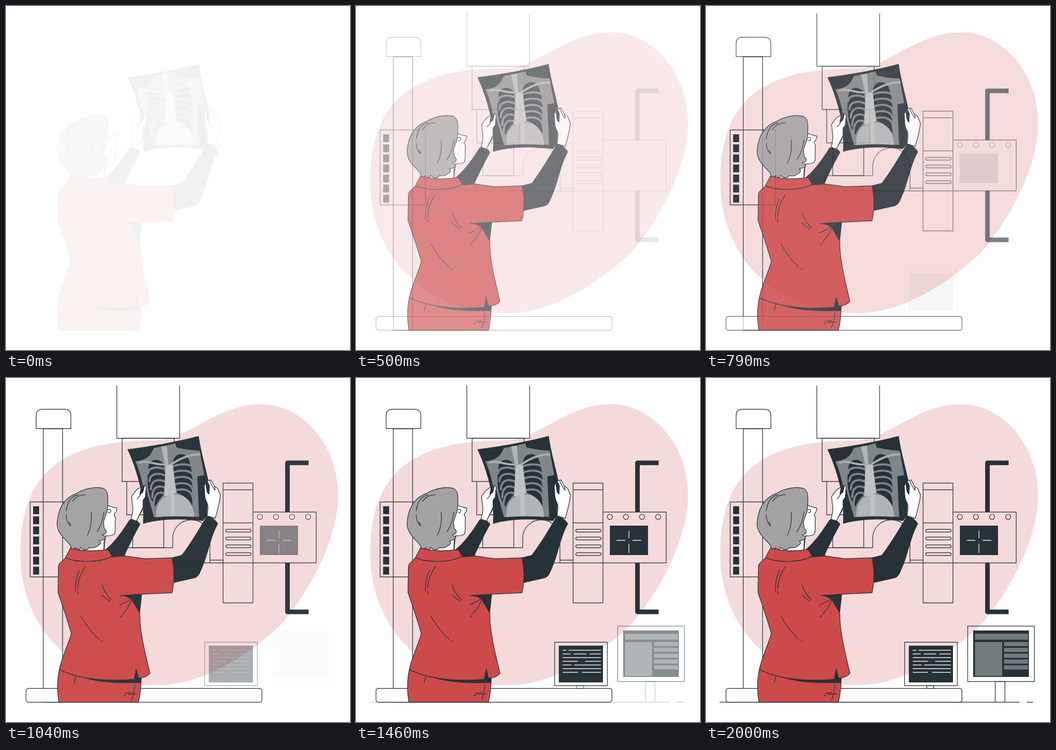
Animation, 748 px wide and 748 px high, one loop 2.04 s. Source, as an HTML page:

```html
<!DOCTYPE html>
<html lang="en">
<head>
<meta charset="utf-8">
<title>X-ray room</title>
<style>
html, body { margin: 0; width: 100%; height: 100%; overflow: hidden; background: #fff; }
svg { display: block; width: 100vw; height: 100vh; }
.line { fill: none; stroke: #263238; stroke-width: 1.4; stroke-linecap: round; stroke-linejoin: round; }
.line .dark, .dark { fill: #263238; stroke: none; }
.white { fill: #fff; }
.red { fill: #cd4a4a; }
.hair { fill: #a3a3a3; }
.pale { fill: #727a7c; stroke: none; }
.tissue { fill: #7f8688; stroke: none; }
.bone { fill: none; stroke: #7f8688; stroke-width: 4.4; }
.clavicle { fill: none; stroke: #a9aeb0; stroke-width: 4.4; }
.bright { fill: #b1b5b7; stroke: none; }
.heart { fill: #bfc3c4; stroke: none; }
.glow { stroke: #fff; }
</style>
</head>
<body>
<svg viewBox="0 0 748 748" class="line">
  <path data-fade="-20 900" fill="#f5dadb" stroke="none" d="M555 57C640 57 722 140 722 255C722 350 660 465 597 537C520 610 420 668 330 668C150 668 31 545 31 380C31 205 125 136 320 136C400 135 455 57 555 57Z"/>

  <!-- floor and stands -->
  <path data-fade="1180 850" d="M30 705H681M698 705H711M629 660H650V705H629Z"/>
  <path data-fade="980 850" d="M480 669H495V675H480Z"/>

  <!-- left tower -->
  <g data-fade="235 650">
    <path d="M81 110.500H123V705H81Z"/>
    <path d="M52.500 269.500H151V432.500H52.500Z"/>
    <g id="buttons" class="dark"></g>
  </g>
  <path data-fade="285 700" class="white" d="M65.500 110V82Q65.500 68 79.500 68H127Q141 68 141 82V110Z"/>
  <rect data-fade="130 1050" class="white" x="43.500" y="675" width="513" height="30" rx="5"/>

  <!-- ceiling unit -->
  <g data-fade="285 700">
    <path class="white" d="M241 17V131H377.500V17"/>
    <path d="M252.500 131H366V225H252.500ZM262.500 225H356V297.500H262.500ZM275.500 297.500H343V369H275.500Z"/>
  </g>
  <path data-fade="335 800" d="M258 369H362.500V349C362.500 326 380 308.500 403 308.500S443.500 326 443.500 349V402H258ZM443.500 396H472M443.500 402H472"/>

  <!-- wall unit -->
  <path data-fade="335 800" stroke-width="10" stroke-linecap="butt" d="M658 184.500H612V291M612 402V508.500H658"/>
  <g data-fade="360 800">
    <path d="M472 228.500H537V489H472ZM472 243H537M472 315H537M472 402H537M537 291.500H674.500V402H537Z"/>
    <g id="slots"></g>
  </g>
  <g data-fade="530 730" id="knobs"></g>
  <g data-fade="637 790">
    <path class="dark" d="M552 321H635V385H552Z"/>
    <path data-fade="680 600" class="glow" d="M567 353H585M602 353H620M593.500 333V348M593.500 361V380"/>
  </g>

  <!-- small monitor -->
  <g data-fade="700 800">
    <path d="M432 574.500H546.500V669H432Z"/>
    <path class="dark" d="M441 582H537V662H441Z"/>
    <path data-fade="820 700" class="glow" d="M450 592H457M463 592H532M450 600H466M474 600H500M508 600H532M450 608H532M450 616H482M499 616H532M450 624H468M475 624H532M450 632H532M450 640H482M492 640H532"/>
  </g>

  <!-- large monitor -->
  <g data-fade="980 900">
    <path d="M569 539.500H714V660H569Z"/>
    <path class="dark" d="M581 549H702V650H581Z"/>
    <g class="pale" id="panes"><path d="M585 556H700V569H585ZM585 574H644V648H585Z"/></g>
  </g>

  <!-- woman -->
  <g data-fade="-50 1280 out">
    <path class="dark" d="M268 309C276 303 286 309 292 318C280 340 268 363 256 390L228 392L214 375C236 357 252 334 268 309Z"/>
    <path class="white" d="M221 276C228 281 235 281 241 283C242 288 238 292 235 297L238 304C236 318 240 334 235 340Q228 344 216 343L213 378H160L150 350L190 290Z"/>
    <path d="M222 287Q226 283 228 289Q226 295 222 292M214 350Q212 362 213 374"/>
    <path class="hair" d="M141 369C143 358 111 345 111 316C113 288 123 262 153 251C173 239 197 236 212 240C225 247 221 266 221 280C221 299 209 305 213 322C213 333 219 329 218 334Q218 340 209 341L217 346Q217 352 203 354Q209 359 201 364Q193 371 181 369L177 373Q168 375 162 368L160 374L151 369L145 374Z"/>
    <path d="M131 289C134 267 144 256 157 254M145 268Q154 254 172 254M131 298Q131 311 139 321M137 313L141 321M185 291C187 309 185 326 177 342M213 291C211 307 206 322 198 334"/>

    <!-- film -->
    <path class="dark" d="M264 155C314 149 369 139 419 126C424 160 433 190 441 227L437 300L428 311C385 306 340 305 298 317C299 288 298 262 292 238C285 208 277 183 264 155Z"/>
    <path class="tissue" d="M322 152Q347 148 368 142L371 151Q396 157 421 158L431 211L416 214L420 302Q368 299 322 303L304 240L297 232C293 210 287 193 281 181Q307 179 316 163Z"/>
    <g class="dark">
      <path d="M310 193C311 176 331 173 342 186C348 204 346 233 342 255Q331 265 325 280C307 257 305 224 310 193Z"/>
      <path d="M363 184C365 166 381 160 394 171C407 191 408 240 405 278Q391 255 372 250C367 227 362 204 363 184Z"/>
    </g>
    <g class="bone" id="ribs"></g>
    <path class="bright" d="M337 149L350 147L353 190L347 192Z"/>
    <path class="heart" d="M347 191Q356 185 363 190L370 249Q361 258 344 257Z"/>
    <path class="bright" d="M327 302C325 270 342 253 368 253C393 254 408 272 409 302Q368 299 327 302Z"/>
    <path class="heart" d="M357 254L366 253L368 299H358Z"/>
    <path class="clavicle" d="M290 184C310 178 324 190 348 188M361 187C377 176 397 166 421 166"/>

    <!-- hands -->
    <path class="white" d="M272 307C275 293 277 287 275 276L273 258C280 247 286 239 294 238L302 233Q306 236 304 244L303 259L298 266V285L283 311Z"/>
    <path class="dark" d="M293 239L302 234L298 249L290 254Z"/>
    <path d="M285 263Q291 257 295 249M298 281L287 304"/>
    <path class="white" d="M437 300C439 286 441 278 437 271Q432 262 432 250L431 234L438 223L446 222L453 235L460 240L466 254Q466 267 455 305Z"/>
    <path class="dark" d="M434 232L438 223L443 234L442 254L437 249Z"/>
    <path d="M443 224L449 236L454 244M453 235L455 243"/>
    <path class="dark" d="M437 299C447 301 456 308 461 317C443 350 440 386 423 421Q419 432 411 435L362 446L358 391L382 385C396 367 416 335 430 311Z"/>

    <!-- clothes -->
    <path class="red" d="M116 634C111 655 111 680 115 705H288C292 688 294 670 294 650Z"/>
    <path class="dark" d="M155 647C200 660 250 656 279 656L283 632L289 651L295 653L293 663C245 664 197 664 155 647Z"/>
    <path class="dark" d="M250 472L296 468L291 513L272 486Z"/>
    <path class="red" d="M133 388L119 401Q115 404 114 409L113 466C121 490 133 523 142 556C134 583 121 608 116 634C160 656 222 660 279 655L283 633L288 652Q304 653 313 642C301 592 290 547 291 511L273 481Q263 473 249 473L296 470L361 467Q369 429 361 391L302 393L259 387L229 389Z"/>
    <path class="red" d="M129 391L140 370C166 377 194 377 222 373L231 388C203 402 156 402 129 391Z"/>
    <path d="M172 411C161 428 157 440 156 458M159 419Q150 441 151 464M156 463V470M209 450Q217 472 229 482M209 472Q217 480 226 485M247 493Q261 488 274 479M273 483Q265 502 254 513M252 516L249 520M163 518C176 540 187 555 202 568M207 571L210 573M152 648L148 663M280 667Q279 686 273 700M259 686L273 684M256 691L260 690M265 688L284 687"/>
  </g>
</svg>
<script>
const LOOP = 2040;
const NS = "http://www.w3.org/2000/svg";

function add(id, tag, attrs) {
  const node = document.createElementNS(NS, tag);
  for (const key in attrs) node.setAttribute(key, attrs[key]);
  document.getElementById(id).append(node);
}

for (let i = 0; i < 7; i++) {
  add("buttons", "rect", { x: 59, y: 279 + i * 21.9, width: 13, height: 17 });
}
for (let i = 0; i < 4; i++) {
  add("slots", "rect", { x: 478, y: 329 + i * 17, width: 55, height: 6, rx: 3 });
  add("knobs", "circle", { cx: 552 + i * 35, cy: 302, r: 5.6 });
}
for (let i = 0; i < 5; i++) {
  add("panes", "rect", { x: 648, y: 574 + i * 12.7, width: 52, height: 9 });
}

// Ribs arch up from the spine; their outer ends drop further lower down.
function rib(inner, outer, y, drop) {
  const mid = (inner + outer) / 2;
  add("ribs", "path", { d: `M${outer} ${y + drop}C${outer} ${y - 4} ${mid} ${y - 8} ${inner} ${y}` });
}
for (let i = 0; i < 5; i++) {
  rib(347, 309 + i * 3, 199 + i * 13.5, 8 + i * 4);
  rib(363, 407, 192 + i * 13.5, 6 + i * 4);
}

const fades = [...document.querySelectorAll("[data-fade]")].map(node => {
  const [start, span, ease] = node.dataset.fade.split(" ");
  return { node, start: +start, span: +span, ease };
});

const smooth = x => x * x * (3 - 2 * x);
const sineOut = x => Math.sin(x * Math.PI / 2);
const origin = performance.now();

function draw() {
  const t = (performance.now() - origin) % LOOP;
  for (const { node, start, span, ease } of fades) {
    const x = Math.min(1, Math.max(0, (t - start) / span));
    node.style.opacity = ease === "out" ? sineOut(x) : smooth(x);
  }
  requestAnimationFrame(draw);
}
draw();
</script>
</body>
</html>
```
